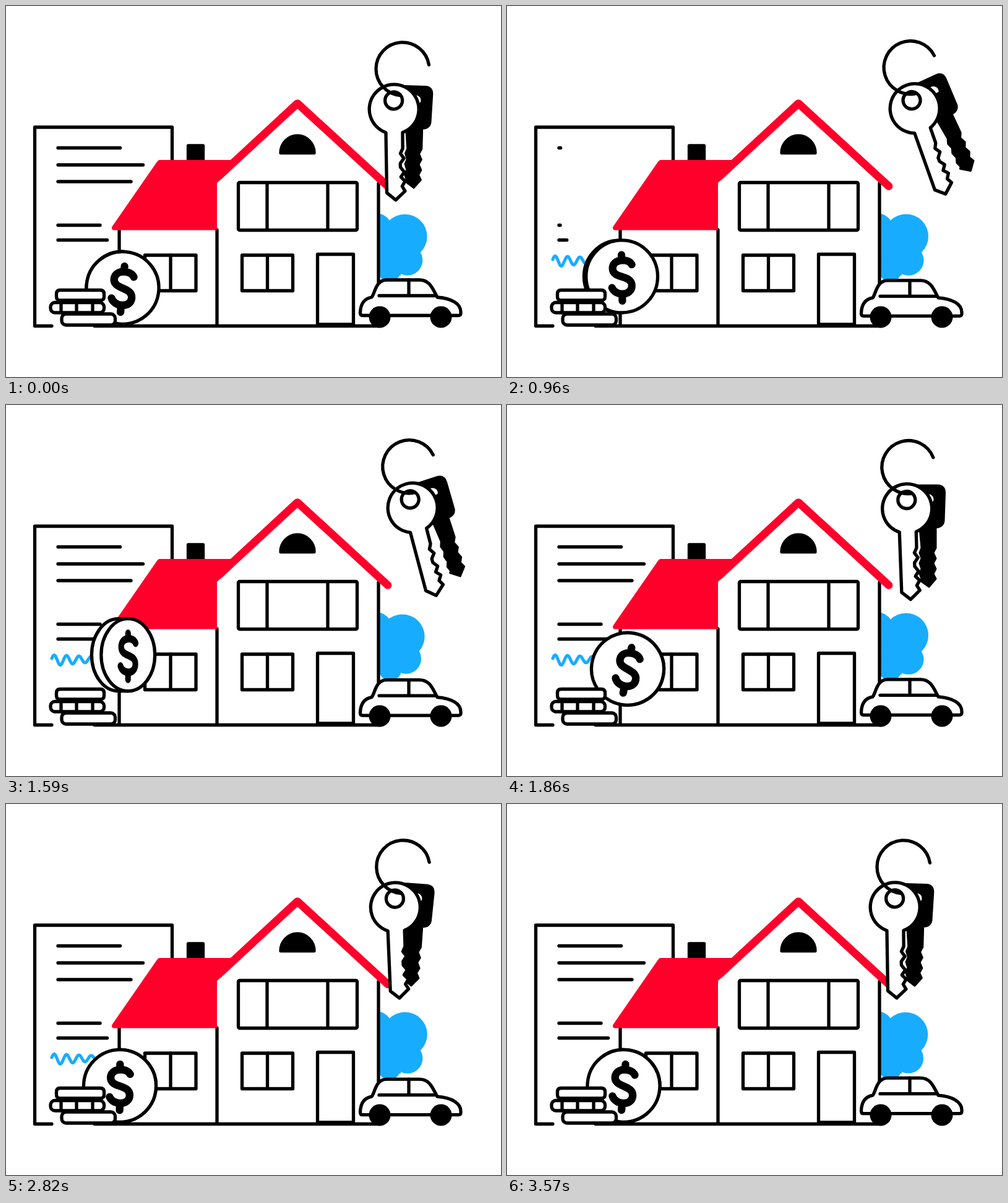
Recreate the animation shown at these times as an HTML page. Size 800x600 px, loop 3.6 s.

```html
<!DOCTYPE html>
<html lang="en">
<head>
<meta charset="utf-8">
<title>Home purchase</title>
<style>
  html, body { margin: 0; width: 100%; height: 100%; overflow: hidden; background: #fff; }
  svg { display: block; }
  .ink { fill: none; stroke: #000; stroke-width: 5.3; stroke-linecap: round; stroke-linejoin: round; }
  .paper { fill: #fff; }
  .solid { fill: #000; }
  .red { fill: #ff002b; }
  .blue { fill: #18acff; }
</style>
</head>
<body>
<svg width="800" height="600" viewBox="0 0 800 600">
  <g class="ink">
    <path d="M74 517.5H46.5V196H268.5V250"/>
    <g id="lines"></g>
    <path id="wave" pathLength="1" stroke="#18acff" stroke-width="5"/>
  </g>

  <g class="blue">
    <circle cx="598" cy="361" r="26"/>
    <rect x="596" y="352" width="42" height="84"/>
    <circle id="leafA" r="36"/>
    <circle id="leafB" r="24.5"/>
    <circle id="leafC" r="18"/>
  </g>

  <g class="ink">
    <path class="paper" stroke="none" d="M183 360H341V286L471 164L602 285V517H183Z"/>
    <path d="M143 517.5H605M183 362V517M341 362V517M602 287V517"/>
    <rect class="solid" x="294.5" y="226" width="24" height="24"/>
    <path class="red" stroke="none" d="M248 249H364L366 262L341 286V362.5H174Q169 361 172 356L244 252Q246 249 248 249Z"/>
    <path d="M343 276L471 157.5L617 291.5" stroke="#ff002b" stroke-width="12.7"/>
    <path class="solid" d="M444 237.5a27 27.5 0 0 1 54 0z"/>
    <rect x="375.5" y="285.5" width="192" height="77" rx="2"/>
    <path d="M422 286V362M520 286V362"/>
    <rect x="381.5" y="403" width="82" height="57.5"/>
    <path d="M422.5 403V460"/>
    <rect x="224.5" y="403" width="82.5" height="57.5"/>
    <path d="M266 403V460"/>
    <rect x="503.5" y="401.5" width="58" height="113.5"/>
  </g>

  <g class="ink">
    <g id="car">
      <path class="paper" d="M576 500.5Q572.5 500.5 572.5 496C573 481 580 473 591 471C596 466 597 443 615 443H668C686 443 690 459 697 471C720 473 735 481 735 495V497Q735 500.5 731 500.5Z"/>
      <path d="M603 468.5H695M651 443V468"/>
    </g>
    <g class="solid" stroke="none">
      <circle cx="604" cy="503" r="17.5"/>
      <circle cx="703" cy="503" r="17.5"/>
    </g>
  </g>

  <g id="coin" class="ink">
    <path id="rim" class="paper"/>
    <ellipse id="face" class="paper" ry="58.5"/>
    <path id="dollar" stroke-width="12.3" d="M16.5 -20C11 -31 -15 -30 -15 -14C-15 3 16 -4 16 14C16 31 -11 31 -16.5 17M0 -36V-27M0 28V38.5"/>
  </g>

  <g class="ink">
    <g id="low"><rect class="paper" x="90" y="498" width="86.5" height="18" rx="7"/></g>
    <g id="mid">
      <rect class="paper" x="72" y="479.5" width="86.5" height="16.5" rx="7"/>
      <path d="M89 480V496M114 480V496M140 480V496"/>
    </g>
    <g id="top">
      <path id="topSide" class="paper"/>
      <ellipse id="topLid" class="paper" cx="120" rx="38.5"/>
    </g>
  </g>

  <g class="ink">
    <path id="dark" class="solid" stroke-width="3" fill-rule="evenodd"/>
    <g id="key">
      <path class="paper" d="M13 52A40 40 0 1 0 -14 51.5L-15 149L-1 161L14.5 147L10 139L15 131L8.5 124L14 116L8 108V102L14 94L8.5 86L12.5 78Z"/>
      <circle class="paper" r="14"/>
    </g>
    <path id="ring"/>
  </g>
</svg>
<script>
const LOOP = 3600;
const $ = id => document.getElementById(id);
const set = (el, attrs) => { for (const k in attrs) el.setAttribute(k, attrs[k]); };
const move = (id, x, y, deg = 0) => set($(id), { transform: `translate(${x} ${y}) rotate(${deg})` });
const clamp = u => Math.min(1, Math.max(0, u));
const ease = u => u * u * (3 - 2 * u);
const ramp = (t, from, to) => ease(clamp((t - from) / (to - from)));
const hop = (t, from, to, height) => {
  const u = clamp((t - from) / (to - from));
  return 4 * height * u * (1 - u);
};

// Rows are [time, ...values]; values ease from row to row.
function track(rows, t) {
  let i = 1;
  while (i < rows.length - 1 && t > rows[i][0]) i++;
  const a = rows[i - 1], b = rows[i], k = ramp(t, a[0], b[0]);
  return a.slice(1).map((v, j) => v + (b[j + 1] - v) * k);
}

// time, ring angle, light key angle, dark key x, y, angle
const KEYS = [
  [0, 0, -1.5, 661, 151, 1.6],
  [600, -18.3, -24.5, 687.5, 134, -31],
  [1320, -17.5, -16, 688, 141, -18.5],
  [1620, -17.3, -15.5, 688, 141.5, -18],
  [1860, -12.5, -2.7, 680, 151, 0],
  [2340, -17, -5.5, 685.5, 149, -2],
  [2820, -1.2, -3, 663, 151, 4],
  [3570, 0, -1.5, 661, 151, 1.6],
  [3600, 0, -1.5, 661, 151, 1.6]
];
// time, x, tilt
const COIN = [
  [0, 188.5, 5], [600, 184, 0.5], [850, 184, 0.5], [1320, 184, -10.5],
  [1860, 195, 10.5], [2340, 189.5, 5], [2820, 184, 0.5], [3600, 188.5, 5]
];
// y, right end; bottom line first
const LINES = [[378.5, 163.5], [354.5, 152], [284, 202], [257, 221.5], [229.5, 184.5]];

const PIVOT = { x: 639.5, y: 65.5 };
const rad = deg => deg * Math.PI / 180;
function swing(x, y, deg) {
  const c = Math.cos(rad(deg)), s = Math.sin(rad(deg));
  const dx = x - PIVOT.x, dy = y - PIVOT.y;
  return [PIVOT.x + dx * c - dy * s, PIVOT.y + dx * s + dy * c];
}

const rows = LINES.map(([y]) => {
  const el = document.createElementNS("http://www.w3.org/2000/svg", "path");
  $("lines").append(el);
  return { el, y };
});

// Plain wavy line on the page
let wave = "";
for (let x = 74; x <= 154; x += 2) {
  const u = (x - 74) / 80;
  wave += `${wave ? "L" : "M"}${x} ${(413 - 2 * u + 9 * (1 - 0.6 * u) * Math.sin(u * 8 * Math.PI + 3.5)).toFixed(1)}`;
}
set($("wave"), { d: wave });

function darkKey() {
  let d = "M-17 -21H17Q28 -20 27.5 -8L26 36Q25 46 13 47";
  const teeth = [80, 88, 97, 105, 114, 122, 130];
  teeth.forEach((y, i) => d += `L${i % 2 ? 9 : 13} ${y}`);
  d += "L2 143L-12 133";
  teeth.reverse().forEach((y, i) => d += `L${i % 2 ? -13 : -10} ${y}`);
  return d + "L-13 47Q-25 46 -26 36L-27.5 -8Q-28 -20 -17 -21ZM-11 1A11 9.5 0 0 1 11 1Q11 8 5 7H-5Q-11 8 -11 1Z";
}
set($("dark"), { d: darkKey() });

const point = deg => `${641 + 43 * Math.cos(rad(deg))} ${101.8 + 43 * Math.sin(rad(deg))}`;
set($("ring"), { d: `M${point(-9)}A43 43 0 1 0 ${point(95)}` });

function drawPage(t) {
  rows.forEach(({ el, y }, i) => {
    const d = 45 * i;
    const size = 1 - ramp(t, 510 + d, 810 + d) + ramp(t, 885 + d, 1185 + d);
    set(el, {
      d: `M84 ${y}H${84 + (LINES[i][1] - 84) * size}`,
      visibility: size > 0.01 ? "visible" : "hidden"
    });
  });
  const from = ramp(t, 2900, 3480), to = ramp(t, 30, 520);
  set($("wave"), {
    "stroke-dasharray": `0 ${from} ${Math.max(0, to - from)} 2`,
    visibility: to - from > 0.01 ? "visible" : "hidden"
  });
}

function drawCoin(t) {
  const [x, tilt] = track(COIN, t);
  const y = 455.8 - hop(t, 850, 2050, 54.6) - hop(t, 2050, 2410, 11);
  const spin = rad(720 * ramp(t, 900, 1860));
  const c = Math.cos(spin), rx = Math.max(0.5, 58.5 * Math.abs(c));
  const depth = -23 * Math.sin(spin) * (c < 0 ? -1 : 1);
  const near = -depth / 2, far = depth / 2;
  move("coin", x, y, tilt);
  set($("rim"), { d: `M${near} -58.5H${far}A${rx} 58.5 0 0 ${depth > 0 ? 1 : 0} ${far} 58.5H${near}Z` });
  set($("face"), { cx: near, rx });
  set($("dollar"), { transform: `translate(${near} 1) scale(${Math.max(0.01, Math.abs(c))} 1)` });
}

function drawStack(t) {
  const lift = Math.sin(Math.PI * clamp((t - 2050) / 450));
  const raise = (id, dy, deg) => set($(id), {
    transform: `translate(0 ${-dy * lift}) rotate(${-deg * lift} 125 490)`
  });
  raise("low", 7, 1.7);
  raise("mid", 9, 1.2);
  raise("top", 12, 1.5);
  const bow = 5 * lift, r = 6;
  set($("topSide"), {
    d: `M${81.5 + r} 459.5H${158.5 - r}Q158.5 459.5 158.5 ${459.5 + r}V${476 - r}` +
       `Q158.5 476 ${158.5 - r} 476Q120 ${476 + bow} ${81.5 + r} 476` +
       `Q81.5 476 81.5 ${476 - r}V${459.5 + r}Q81.5 459.5 ${81.5 + r} 459.5Z`
  });
  set($("topLid"), { cy: 461, ry: bow, visibility: lift > 0.1 ? "visible" : "hidden" });
}

function drawKeys(t) {
  const [ring, key, x, y, dark] = track(KEYS, t);
  const [hx, hy] = swing(626.6, 152.8, ring);
  set($("ring"), { transform: `rotate(${ring} ${PIVOT.x} ${PIVOT.y})` });
  move("key", hx, hy, key);
  move("dark", x, y, dark);
}

function drawYard(t) {
  const sway = Math.cos(2 * Math.PI * (t / 900 - 0.08));
  set($("leafA"), { cx: 641.8 + 3.2 * sway, cy: 374 - 1.5 * sway });
  set($("leafB"), { cx: 647.2 + 1.8 * sway, cy: 410.5 + 0.8 * sway });
  set($("leafC"), { cx: 620.5 - sway, cy: 428 });
  move("car", 0, 1.2 * (1 - Math.cos(2 * Math.PI * t / 300)));
}

function draw(t) {
  drawPage(t);
  drawYard(t);
  drawCoin(t);
  drawStack(t);
  drawKeys(t);
}

const start = performance.now();
function tick(now) {
  draw(Math.max(0, now - start) % LOOP);
  requestAnimationFrame(tick);
}
draw(0);
requestAnimationFrame(tick);
</script>
</body>
</html>
```
